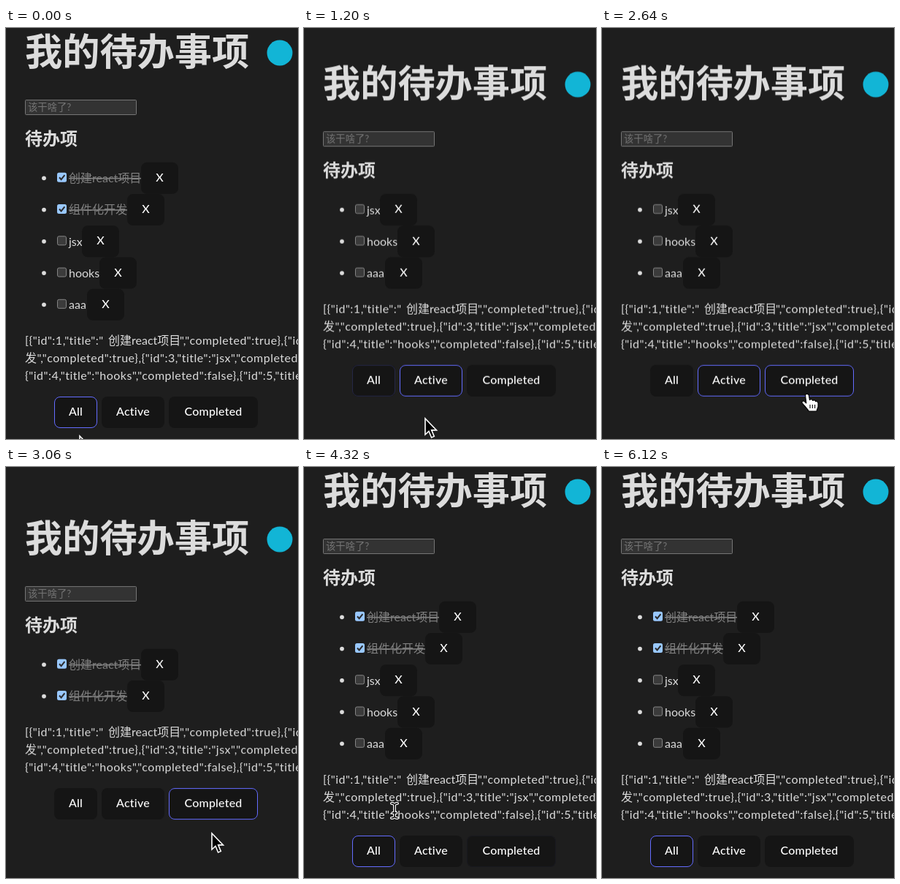
An HTML page that plays this animation: 400x562 px, repeating every 6.18 s.

```html
<!DOCTYPE html>
<html lang="zh">
<head>
<meta charset="utf-8">
<title>待办事项</title>
<style>
html, body { margin: 0; width: 100%; height: 100%; overflow: hidden; background: #1e1e1e; }
svg { display: block; width: 100vw; height: 100vh; }
text { font: 400 16px Lato, 'Noto Sans CJK SC', 'Noto Sans CJK', sans-serif; fill: #dcdcdc; white-space: pre; }
.title { font-size: 51.2px; font-weight: 600; }
.sub { font-size: 24px; font-weight: 600; }
.hint { font-size: 13.33px; fill: #757575; }
.struck { fill: #808080; text-decoration: line-through; }
.json { letter-spacing: .5px; }
.label { font-weight: 500; fill: #fff; text-anchor: middle; letter-spacing: .2px; }
.btn { fill: #151515; }
.ring { fill: none; stroke: #646cff; }
.box { fill: #3b3b3b; stroke: #858585; }

.anim { animation: 6180ms step-end infinite; }
#head { animation-name: head; }
#foot { animation-name: foot; }
#done { animation-name: done; }
#open { animation-name: open; }
.ring { animation-timing-function: ease; }
#ring0 { animation-name: ringAll; }
#ring1 { animation-name: ringActive; }
#ring2 { animation-name: ringCompleted; }
#cursor { animation-name: move; animation-timing-function: ease-in-out; }
#arrow { animation-name: arrow; }
#hand { animation-name: hand; }
#beam { animation-name: beam; }

/* the page stays vertically centred as rows come and go */
@keyframes head {
  0%, 67.96%, 100% { transform: translateY(0); }
  18.45% { transform: translateY(43.25px); }
  45.63% { transform: translateY(64.9px); }
}
@keyframes foot {
  0%, 67.96%, 100% { transform: translateY(0); }
  18.45% { transform: translateY(-43.25px); }
  45.63% { transform: translateY(-64.9px); }
}
@keyframes done {
  0%, 45.63%, 100% { opacity: 1; }
  18.45% { opacity: 0; }
}
@keyframes open {
  0%, 67.96%, 100% { opacity: 1; transform: translateY(0); }
  18.45% { opacity: 1; transform: translateY(-43.25px); }
  45.63% { opacity: 0; transform: translateY(-43.25px); }
}
@keyframes ringAll {
  0%, 17.5%, 64.2%, 100% { opacity: 1; }
  21.5%, 60.2% { opacity: 0; }
}
@keyframes ringActive {
  0%, 13.6%, 48.7%, 100% { opacity: 0; }
  17.6%, 44.7% { opacity: 1; }
}
@keyframes ringCompleted {
  0%, 38.8%, 71%, 100% { opacity: 0; }
  42.5%, 67% { opacity: 1; }
}
@keyframes move {
  0% { transform: translate(100px, 557px); }
  9.7%, 32% { transform: translate(165px, 533px); }
  40.5%, 54.4% { transform: translate(281px, 500px); }
  58.7%, 73% { transform: translate(124px, 470px); }
  77%, 86.4% { transform: translate(115px, 469px); }
  95%, 100% { transform: translate(100px, 580px); }
}
@keyframes arrow {
  0%, 18.45%, 45.63%, 92.5%, 100% { opacity: 1; }
  13.6%, 38.8%, 57% { opacity: 0; }
}
@keyframes hand {
  0%, 18.45%, 45.63%, 67.96%, 92.5%, 100% { opacity: 0; }
  13.6%, 38.8%, 57%, 90% { opacity: 1; }
}
@keyframes beam {
  0%, 90%, 100% { opacity: 0; }
  67.96% { opacity: 1; }
}
</style>
</head>
<body>
<svg id="stage" viewBox="0 0 400 562"></svg>
<script>
const text = (x, y, cls, s) => `<text x="${x}" y="${y}" class="${cls}">${s}</text>`;

const button = (x, y, w, label) =>
  `<rect class="btn" x="${x}" y="${y}" width="${w}" height="43" rx="8"/>` +
  text(x + w / 2, y + 26, 'label', label);

const check = (y, on) => on
  ? `<rect x="70" y="${y - 7.5}" width="13" height="13" rx="2.5" fill="#99c8ff"/>
     <path d="M73 ${y - 1}l2.6 2.8 4.8-6" fill="none" stroke="#2b2b2b" stroke-width="2"/>`
  : `<rect class="box" x="70.5" y="${y - 7}" width="12" height="12" rx="2"/>`;

// buttonX is where the label ends and the delete button begins
const row = ([label, buttonX], i, on) => {
  const y = 205.3 + i * 43.25;
  return `<circle cx="52" cy="${y}" r="2.9" fill="#dcdcdc"/>` + check(y, on) +
    text(86, y + 5.7, on ? 'struck' : '', label) + button(buttonX, y - 21.5, 51, 'X');
};

const done = [['创建react项目', 185], ['组件化开发', 166]];
const open = [['jsx', 104], ['hooks', 128], ['aaa', 111]];
const filters = [['All', 66, 59], ['Active', 131, 86], ['Completed', 223, 122]];

const filter = ([label, x, w], i) => button(x, 504, w, label) +
  `<rect id="ring${i}" class="anim ring" x="${x + .5}" y="504.5" width="${w - 1}" height="42" rx="7.5"/>`;

document.getElementById('stage').innerHTML = `
  <g id="head" class="anim">
    ${text(26, 51, 'title', '我的待办事项')}
    <circle cx="375" cy="34" r="17.5" fill="#12b5d6"/>
    <rect x="26.5" y="98.5" width="152" height="20" rx="1" fill="#333" stroke="#767676"/>
    ${text(30, 113, 'hint', '该干啥了?')}
    ${text(26, 159.5, 'sub', '待办项')}
    <g id="done" class="anim">${done.map((r, i) => row(r, i, true)).join('')}</g>
  </g>
  <g id="open" class="anim">${open.map((r, i) => row(r, i + 2, false)).join('')}</g>
  <g id="foot" class="anim">
    ${text(26, 433, 'json', '[{"id":1,"title":"')}
    ${text(140, 433, '', '创建react项目')}
    ${text(238, 433, 'json', '","completed":true},{"id":2,"title":"组件化开')}
    ${text(26, 457, 'json', '发","completed":true},{"id":3,"title":"jsx","completed":false},')}
    ${text(26, 481, 'json', '{"id":4,"title":"hooks","completed":false},{"id":5,"title":"aaa","completed":false}]')}
    ${filters.map(filter).join('')}
  </g>
  <g id="cursor" class="anim">
    <path id="arrow" class="anim" d="M1 1V23L6 18.3 9.6 27 13.3 25.4 9.7 16.9H16.5Z"
      fill="#000" stroke="#fff" stroke-width="1.6"/>
    <g id="hand" class="anim" stroke="#000" stroke-width="1.1" stroke-linejoin="round">
      <path fill="#fff" d="M-2.4 2.5C-2.4-.3 2-.3 2.4 2.5L3.4 8.6C5 7 7.3 7.6 7.6 9.5 9.2 8.4 11.3 9 11.6 10.8
        13.4 10 15 11.2 15 13.2V17.5C15 19.5 13.2 21 13 24H2.2C1.5 21.5-1.8 19-3.5 16.6L-6.6 13
        C-8 11 -5.6 9.2-3.8 10.6L-1.2 13Z"/>
      <path fill="none" d="M4 15v5M7.3 15v5M10.6 15v5"/>
    </g>
    <g id="beam" class="anim" fill="none" stroke-linecap="round">
      <path id="stem" d="M-4-10Q0-10 0-7Q0-10 4-10M0-7V7M-4 10Q0 10 0 7Q0 10 4 10M-2.5 3H2.5"
        stroke="#fff" stroke-width="3.6"/>
      <use href="#stem"/>
      <path d="M-4-10Q0-10 0-7Q0-10 4-10M0-7V7M-4 10Q0 10 0 7Q0 10 4 10M-2.5 3H2.5"
        stroke="#000" stroke-width="1.5"/>
    </g>
  </g>`;
</script>
</body>
</html>
```
